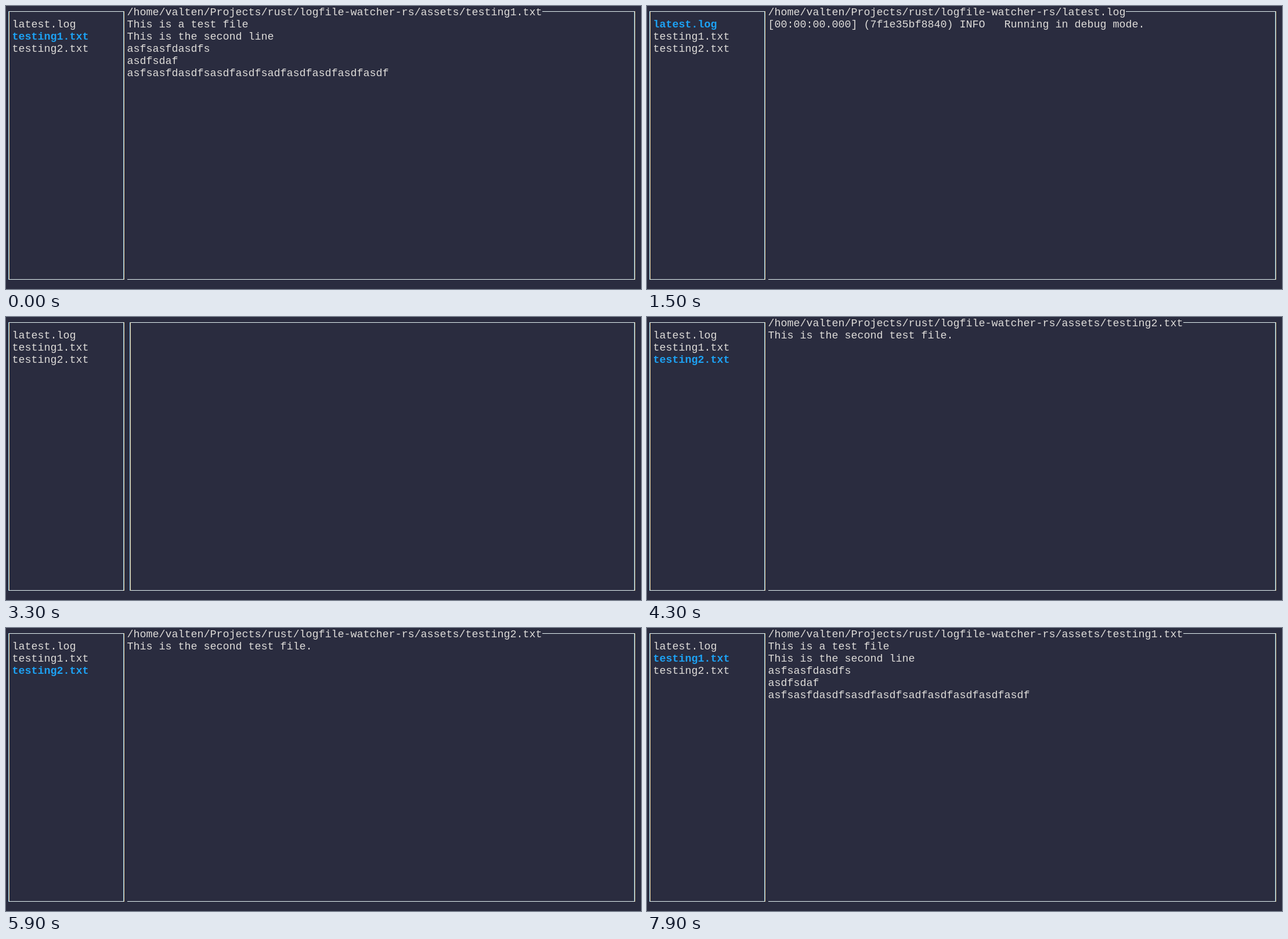
These frames come from a looping animation (1094x488 px, 8 s). An HTML page:

```html
<!DOCTYPE html>
<html lang="en">
<head>
<meta charset="utf-8">
<title>Log file watcher</title>
<style>
  html, body { margin: 0; width: 100%; height: 100%; overflow: hidden; background: #2a2c3f; }
  svg { display: block; width: 1094px; height: 488px; }
  text { font: 18.33px "Liberation Mono", monospace; fill: #dedcd9; white-space: pre; }
  .selected { font-weight: bold; fill: #1da2f4; }
  .across { fill: #e6f4f4; }
  .cool { fill: #86c8ee; }
  .warm { fill: #ecc890; }

  .view { visibility: hidden; animation: 8s step-end infinite; }
  #first { animation-name: first; }
  #second { animation-name: second; }
  #log { animation-name: log; }
  #none { animation-name: none-selected; }

  @keyframes first {
    0%, 17.5%, 27.5%, 81.25%, 98.75% { visibility: visible; }
    8.75%, 18.75%, 35%, 83.75% { visibility: hidden; }
    100% { visibility: visible; }
  }
  @keyframes second {
    0%, 17.5%, 41.25%, 62.5%, 81.25%, 100% { visibility: hidden; }
    8.75%, 35%, 53.75%, 73.75% { visibility: visible; }
  }
  @keyframes log {
    0%, 27.5%, 98.75%, 100% { visibility: hidden; }
    18.75%, 83.75% { visibility: visible; }
  }
  @keyframes none-selected {
    0%, 53.75%, 73.75%, 100% { visibility: hidden; }
    41.25%, 62.5% { visibility: visible; }
  }
</style>
</head>
<body>
<svg id="screen" viewBox="0 0 1094 488"></svg>
<script>
const CELL_W = 11, CELL_H = 21, BASELINE = 16, INSET = -0.5;
const PANEL = 19, RIGHT = 98, BOTTOM = 22;
const project = "/home/valten/Projects/rust/logfile-watcher-rs/";
const files = ["latest.log", "testing1.txt", "testing2.txt"];

const views = [
  { id: "first", selected: 1, title: project + "assets/testing1.txt", lines: [
    "This is a test file",
    "This is the second line",
    "asfsasfdasdfs",
    "asdfsdaf",
    "asfsasfdasdfsasdfasdfsadfasdfasdfasdfasdf"
  ] },
  { id: "second", selected: 2, title: project + "assets/testing2.txt",
    lines: ["This is the second test file."] },
  { id: "log", selected: 0, title: project + "latest.log",
    lines: ["[00:00:00.000] (7f1e35bf8840) INFO   Running in debug mode."] },
  { id: "none", selected: -1, title: "", lines: [] }
];

const label = (text, col, row, cls = "") =>
  `<text class="${cls}" x="${col * CELL_W + INSET}" y="${row * CELL_H + BASELINE}">${text}</text>`;

const rect = (cls, x, y, width, height) =>
  `<rect class="${cls}" x="${x}" y="${y}" width="${width}" height="${height}"/>`;

const middle = col => col * CELL_W + 5;

const across = (x1, x2, row) => rect("across", x1, row * CELL_H + 9, x2 - x1, 1);

// Vertical rules have the colour fringes of subpixel rendering.
const down = col =>
  rect("cool", middle(col) - 1, 9, 1, 463) + rect("warm", middle(col), 9, 1, 463);

function drawView({ id, selected, title, lines }) {
  const list = files.map((name, i) => label(name, 1, i + 1, i === selected ? "selected" : ""));
  const content = lines.map((line, i) => label(line, PANEL, i + 1));
  const open = selected >= 0;
  const topStart = open ? (PANEL + title.length) * CELL_W : middle(PANEL);
  const bottomStart = open ? PANEL * CELL_W : middle(PANEL);
  return `<g id="${id}" class="view">` + [
    ...list, label(title, PANEL, 0), ...content,
    across(topStart, middle(RIGHT), 0),
    across(bottomStart, middle(RIGHT), BOTTOM),
    open ? "" : down(PANEL)
  ].join("") + "</g>";
}

document.getElementById("screen").innerHTML = [
  down(0), down(PANEL - 1), down(RIGHT),
  across(middle(0), middle(PANEL - 1), 0),
  across(middle(0), middle(PANEL - 1), BOTTOM),
  ...views.map(drawView)
].join("");
</script>
</body>
</html>
```
